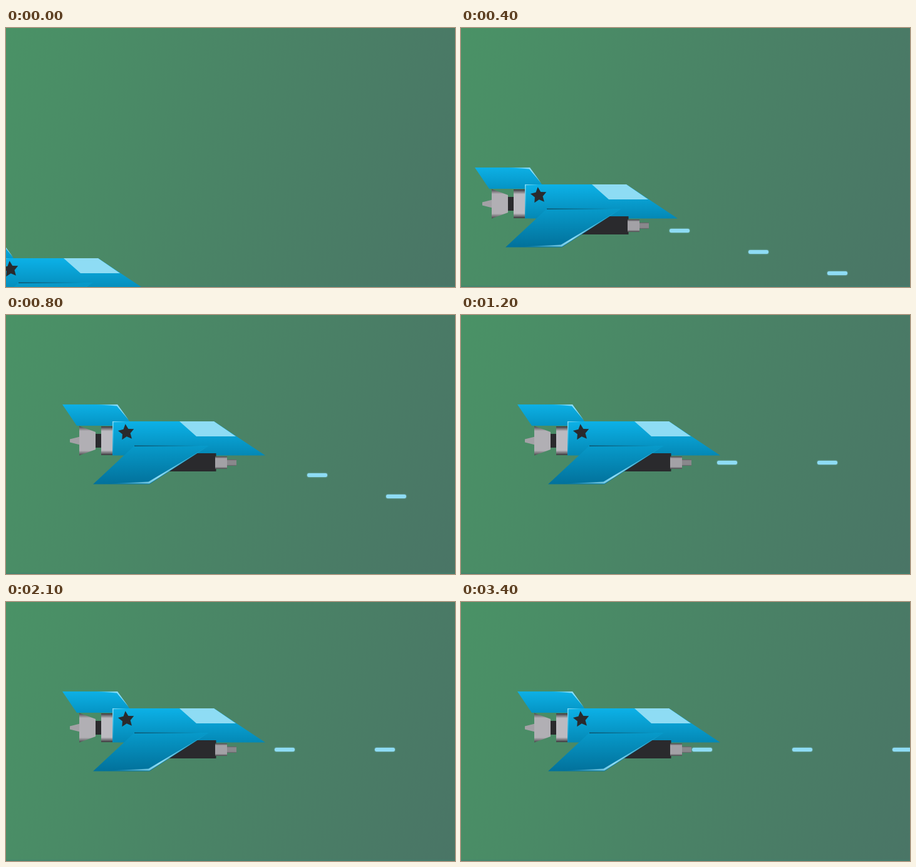
Animation of 717x414 px, one loop 3500 ms. Source, as an HTML page with a canvas:

```html
<!DOCTYPE html>
<html lang="en">
<head>
<meta charset="utf-8">
<title>Starfighter</title>
<style>
  html, body { margin: 0; width: 100%; height: 100%; overflow: hidden; background: #4a8466; }
  canvas { display: block; }
</style>
</head>
<body>
<canvas id="stage" width="717" height="414"></canvas>
<script>
const ctx = document.getElementById('stage').getContext('2d');
const FRAME = 100, FRAMES = 35;
const SPEED = 4.25, SHOT_SPEED = 20, SHOT_EVERY = 8, FIRST_SHOT = 2;
const HOME = { x: 170, y: 170 }, MUZZLE = { x: 199, y: 66 };
const DARK = '#2a2a2d', SHINE = '#8edcf4', CLEAR = '#8edcf400';

const clamp = (v, low, high) => Math.round(Math.min(high, Math.max(low, v)));

// Simulation ticks after i pictures: the pace drops from 7 to 2.8 per picture.
const ticksAt = i => Math.round(Math.min(7 * i, 8 + 5 * i, 24 + 3 * i, 26.4 + 2.8 * i));

// Place of the ship after n ticks: a straight diagonal climb, then rest.
function shipAt(n) {
  const left = SPEED * (28 - n);
  return {
    x: HOME.x + clamp(-67.8 - left, -185, 0),
    y: HOME.y + clamp(79.7 + left, 0, 198)
  };
}

function fade(x0, y0, x1, y1, ...colors) {
  const g = ctx.createLinearGradient(x0, y0, x1, y1);
  colors.forEach((c, i) => g.addColorStop(i / (colors.length - 1), c));
  return g;
}

function poly(fill, ...p) {
  ctx.beginPath();
  for (let i = 0; i < p.length; i += 2) ctx.lineTo(p[i], p[i + 1]);
  ctx.fillStyle = fill;
  ctx.fill();
}

function rect(fill, x, y, w, h) {
  ctx.fillStyle = fill;
  ctx.fillRect(x, y, w, h);
}

// Plate with level top and bottom edges, shaded downwards.
function plate(top, bottom, y0, y1, topL, topR, botL, botR) {
  poly(fade(0, y0, 0, y1, top, bottom), topL, y0, topR, y0, botR, y1, botL, y1);
}

// Round part along a level axis, h0 and h1 being its half heights at both ends.
function tube(light, rim, axis, x0, x1, h0, h1 = h0) {
  const h = Math.max(h0, h1);
  const fill = fade(0, axis - h, 0, axis + h, rim, light, light, light, light, light, rim);
  poly(fill, x0, axis - h0, x1, axis - h1, x1, axis + h1, x0, axis + h0);
}

function star(cx, cy, r) {
  const pts = [];
  for (let i = 0; i < 10; i++) {
    const a = (i * 36 - 96) * Math.PI / 180, d = i % 2 ? r / 2 : r;
    pts.push(cx + d * Math.cos(a), cy + d * Math.sin(a));
  }
  poly(DARK, ...pts);
}

// Drawn with the top left corner of the hull as origin.
function ship() {
  // tail fin
  plate('#0db0e5', '#0594c4', -27, 7, -80, 8, -57, 32);
  poly(fade(-28, 0, 8, 0, CLEAR, SHINE), -28, -27, 8, -27, 26, -2, 7, -24.5);

  // engine
  tube('#a3a1a6', '#a3a1a6', 31, -68, -52, 2.5, 6.5);
  tube('#b1afb4', '#454447', 31, -53, -27, 23.5, 14);
  tube(DARK, DARK, 31, -27, -18, 11);
  tube('#bcbac0', '#38373a', 31, -18, 0, 23);

  // hull
  plate('#0cb1e7', '#0488b5', 0, 54.5, 0, 162, 0, 244);
  rect(fade(0, 0, 0, 54, SHINE, CLEAR), 0, 0, 1.5, 54);
  rect(fade(0, 0, 22, 0, SHINE, CLEAR), 0, 0, 22, 1.2);
  plate(SHINE, SHINE, 0, 24, 107, 162, 134, 197);
  star(22, 17.7, 13.4);

  // gun
  tube(DARK, DARK, 65.5, 88, 165.5, 14.5);
  tube('#a3a1a6', '#48474a', 66, 164, 183, 10);
  tube('#89888c', '#5a595c', 66, 183, 198, 5);

  // wing
  plate('#079aca', '#02719b', 39, 100.5, 35, 154, -31, 59);
  rect(fade(35, 0, 140, 0, '#10303d', '#10303d00'), 35, 38.7, 105, 1);
  poly(fade(-5, 0, 154, 0, CLEAR, SHINE, CLEAR), 154, 39, 59, 99.5, -5, 99.5, 57.5, 96.5);
}

function shot(x, y) {
  ctx.save();
  ctx.shadowColor = ctx.fillStyle = SHINE;
  ctx.shadowBlur = 2;
  ctx.beginPath();
  ctx.roundRect(x, y - 3, 32, 6, 3);
  ctx.fill();
  ctx.restore();
}

function draw(n) {
  rect(fade(-25, 75, 742, 339, '#4a9266', '#4a7566'), 0, 0, 717, 414);
  rect('#40807299', 0, 412, 717, 2);

  // Each shot keeps the height the gun had when it fired.
  for (let born = FIRST_SHOT; born <= n; born += SHOT_EVERY) {
    const from = shipAt(born);
    shot(from.x + MUZZLE.x + SHOT_SPEED * (n - born), from.y + MUZZLE.y);
  }

  const at = shipAt(n);
  ctx.save();
  ctx.translate(at.x, at.y);
  ship();
  ctx.restore();
}

const start = performance.now();
function loop() {
  draw(ticksAt(Math.floor((performance.now() - start) / FRAME) % FRAMES));
  requestAnimationFrame(loop);
}
loop();
</script>
</body>
</html>
```
